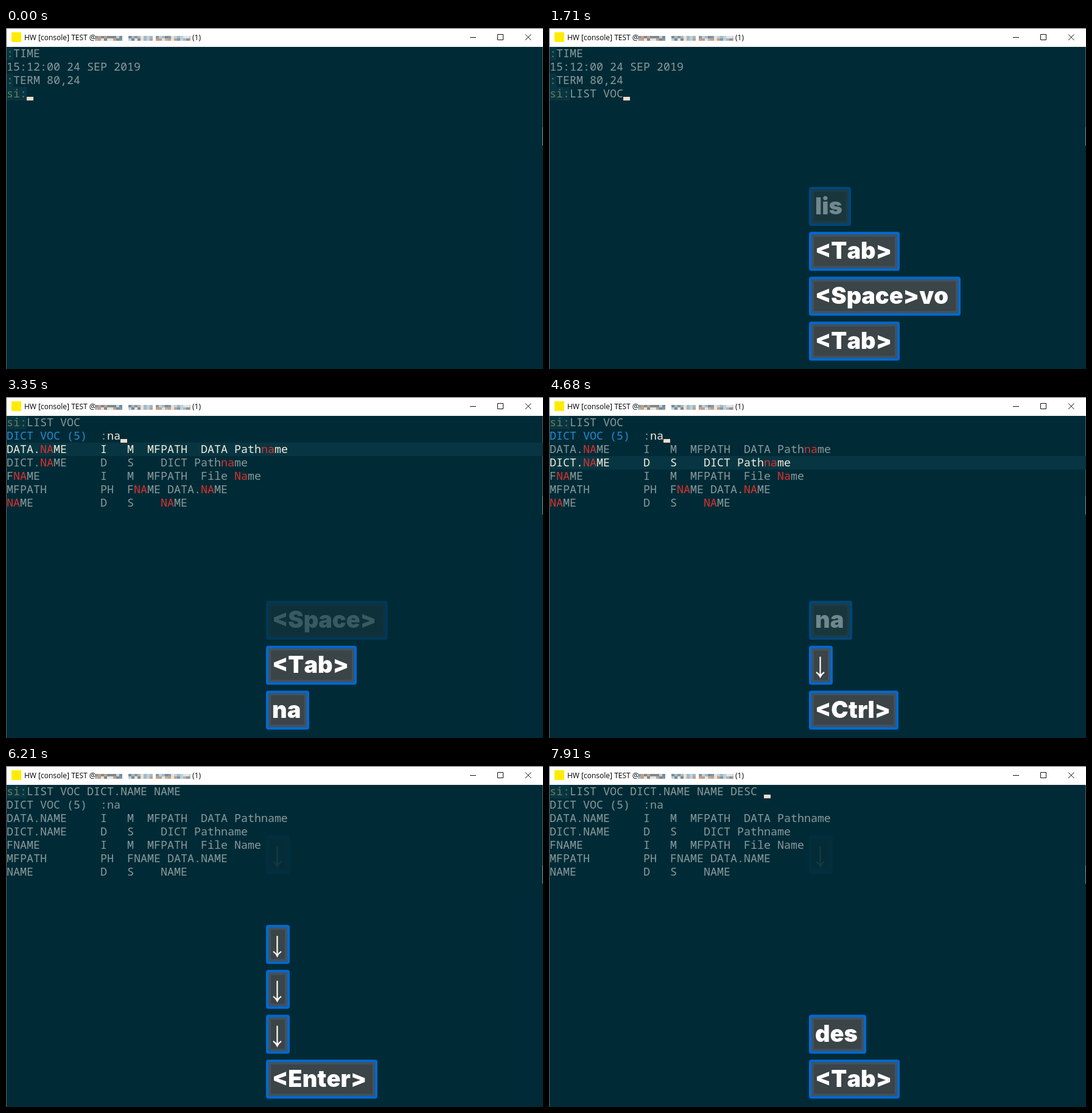
Recreate the animation shown at these times as an HTML page. Size 882 px wide and 560 px high, loop 8000 ms.

```html
<!DOCTYPE html>
<html lang="en">
<head>
<meta charset="utf-8">
<title>Console completion</title>
<style>
html, body { margin: 0; width: 100%; height: 100%; overflow: hidden; background: #002b36; }
svg { display: block; }
text { white-space: pre; }
.title { font: 12px "Open Sans", sans-serif; fill: #000; }
.term { font: 18.333px "Noto Sans Mono", monospace; fill: #8a9a9c; }
.bright { fill: #f3eedc; }
.blue { fill: #268bd2; }
.red { fill: #dc322f; }
.prompt { fill: #6f7a58; }
.key text { font: 900 38px Inter, sans-serif; font-kerning: none; fill: #fff; }
.key path { fill: none; stroke: #fff; stroke-width: 2.2; }
</style>
</head>
<body>
<svg width="882" height="560" viewBox="0 0 882 560">
  <rect width="882" height="560" fill="#002b36"/>
  <rect width="882" height="31" fill="#fff"/>
  <rect width="882" height="1" fill="#5c6468"/>
  <rect width="1" height="560" fill="#5c6468"/>
  <rect x="881" y="31" width="1" height="132" fill="#4d6067"/>
  <rect x="881" y="163" width="1" height="30" fill="#84949a"/>
  <rect x="9" y="7" width="16" height="16" fill="#ffec00"/>
  <text class="title" x="30" y="20">HW [console] TEST @</text>
  <text class="title" x="306" y="20">(1)</text>
  <g id="mosaic"></g>
  <path d="M762 15.5h10M807.5 10.5h9v9h-9zM853 10.5l9.5 9.5M862.5 10.5l-9.5 9.5" fill="none" stroke="#111"/>
  <g id="screen" class="term"></g>
  <g id="keys"></g>
</svg>
<script>
const LOOP = 8000, CELL = 11, LINE = 22, TOP = 31;
const MENU_OPEN = 2650, MENU_CLOSE = 5970;
const $ = id => document.getElementById(id);

const base = 'LIST VOC ', picked = base + 'DICT.NAME ', both = picked + 'NAME ';
const typed = [
  [0, ''], [80, 'l'], [320, 'li'], [400, 'lis'], [720, 'LIST'], [1020, 'LIST '],
  [1190, 'LIST v'], [1260, 'LIST vo'], [1570, 'LIST VOC'], [1950, base],
  [4830, picked], [5970, both], [7220, both + 'd'], [7310, both + 'de'],
  [7460, both + 'des'], [7910, both + 'DESC ']
];
const queries = [[0, ''], [3200, 'n'], [3270, 'na']];
const selections = [[0, 0], [4360, 1], [5200, 2], [5430, 3], [5590, 4]];
const hiddenCursor = [[2340, MENU_OPEN], [MENU_CLOSE, 6440], [6970, 7220]];

// Each key: fade start, then its labels as [time, text, box width].
const TAB = '<Tab>', SPACE = '<Space>', DOWN = '↓';
const keys = [
  [1555, [80, 'l', 33], [320, 'li', 46], [400, 'lis', 69]],
  [1720, [550, TAB, 149]],
  [2490, [1020, SPACE, 200], [1190, SPACE + 'v', 224], [1260, SPACE + 'vo', 249]],
  [2580, [1420, TAB, 149]],
  [3120, [1950, SPACE, 200]],
  [3810, [2490, TAB, 149]],
  [4520, [3200, 'n', 46], [3270, 'na', 71]],
  [5510, [4360, DOWN, 39]],
  [5900, [4510, '<Ctrl>', 147], [4750, '<Ctrl>+' + TAB, 298]],
  [6440, [5200, DOWN, 39]],
  [6600, [5430, DOWN, 39]],
  [6830, [5590, DOWN, 39]],
  [7020, [5740, '<Enter>', 183]],
  [9000, [7220, 'd', 46], [7310, 'de', 71], [7460, 'des', 94]],
  [9000, [7760, TAB, 149]]
].map(([fade, ...labels]) => ({ fade, labels }));

const field = (name, type, kind, rest) =>
  name.padEnd(14) + type.padEnd(4) + kind.padEnd(3) + rest;
const matches = [
  field('DATA.NAME', 'I', 'M', 'MFPATH  DATA Pathname'),
  field('DICT.NAME', 'D', 'S', '  DICT Pathname'),
  field('FNAME', 'I', 'M', 'MFPATH  File Name'),
  field('MFPATH', 'PH', '', '').slice(0, 18) + 'FNAME DATA.NAME',
  field('NAME', 'D', 'S', '  NAME')
];
const numbered = Array.from({ length: 14 }, (_, i) =>
  field('F' + (i + 1), 'D', 'S', '  F' + (i + 1)));
const allItems = [
  matches[0], field('DESC', 'I', 'S', '  Description'), matches[1],
  ...numbered, ...matches.slice(2),
  field('SIZE', 'D', 'S', '  Size'), field('TYPE', 'I', 'S', '  Type')
];

const last = (list, t) => list.filter(e => e[0] <= t).pop();
const esc = s => s.replace(/</g, '&lt;').replace(/>/g, '&gt;');
const rect = (x, y, w, h, fill, extra = '') =>
  `<rect x="${x}" y="${y}" width="${w}" height="${h}" fill="${fill}" ${extra}/>`;
const span = (cls, s) => `<tspan class="${cls}">${s}</tspan>`;
const row = (r, html, cls = '') =>
  `<text class="${cls}" x="1" y="${TOP + LINE * r + 17}">${html}</text>`;
const shade = (r, w) => rect(1, TOP + LINE * r, w, LINE, '#073642');
const cursor = (r, col) =>
  rect(1 + CELL * col, TOP + LINE * r + 16, CELL, 6, '#f6dacb');
const promptRow = (r, prompt, text) =>
  shade(r, CELL * prompt.length) + row(r, span('prompt', prompt) + text);

function menu(t) {
  const active = t < MENU_CLOSE;
  const query = last(queries, t)[1], chosen = last(selections, t)[1];
  const items = query === 'na' ? matches : allItems;
  const head = `DICT VOC (${items.length})`.padEnd(14);
  let out = row(1, active ? span('blue', head) + ':' + span('bright', query) : head + ':' + query);
  items.forEach((item, i) => {
    const lit = active && i === chosen;
    const html = active && query === 'na' ? item.replace(/na/gi, m => span('red', m)) : item;
    out += (lit ? shade(i + 2, 881) : '') + row(i + 2, html, lit ? 'bright' : '');
  });
  return out + (active ? cursor(1, 15 + query.length) : '');
}

function screen(t) {
  const text = last(typed, t)[1], opened = t >= MENU_OPEN;
  const r = opened ? 0 : 3;
  let out = promptRow(r, 'si:', text);
  out += opened ? menu(t)
    : promptRow(0, ':', 'TIME') + row(1, '15:12:00 24 SEP 2019') + promptRow(2, ':', 'TERM 80,24');
  const inMenu = opened && t < MENU_CLOSE;
  const hidden = hiddenCursor.some(([a, b]) => t >= a && t < b);
  return out + (inMenu || hidden ? '' : cursor(r, 3 + text.length));
}

function keyBox(label, width, slot, opacity) {
  const glyph = label === DOWN
    ? '<path d="M18.5 18V51M12 43.5Q16.5 46.5 18.5 51Q20.5 46.5 25 43.5"/>'
    : `<text x="10" y="44.5">${esc(label)}</text>`;
  return `<g class="key" opacity="${opacity}" transform="translate(427 ${(482.2 - 73.7 * slot).toFixed(1)})">` +
    rect(0, 0, width, 64, '#0069d2', 'rx="4"') +
    rect(4, 4, width - 8, 56, '#41525f') +
    rect(8, 8, width - 16, 48, '#3b4447') + glyph + '</g>';
}

function keyStack(t) {
  const pressed = keys.filter(k => k.labels[0][0] <= t);
  const boxes = pressed.map(({ fade, labels }, i) => {
    const [, label, width] = last(labels, t);
    const opacity = t < fade ? 1 : 0.86 - 0.212 * Math.floor((t - fade) / 76);
    return opacity > 0.02 ? keyBox(label, width, pressed.length - 1 - i, opacity.toFixed(2)) : '';
  });
  // A faint trace of one arrow stays on screen.
  return boxes.join('') + (t >= 5814 ? keyBox(DOWN, 39, 5, 0.07) : '');
}

function drawMosaic() {
  const tones = ['#8497a3', '#c49f86', '#b4d3e4', '#e9e2d8', '#7c8a92', '#a9b7bf'];
  let seed = 7, out = '';
  const random = () => (seed = seed * 16807 % 2147483647) / 2147483647;
  for (const [from, to] of [[146, 191], [201, 241], [246, 303]])
    for (let x = from; x < to; x += 5)
      for (let y = 13; y < 21; y += 4)
        out += rect(x, y, Math.min(5, to - x), 4, tones[Math.floor(random() * tones.length)]);
  $('mosaic').innerHTML = out;
}

const shown = {};
function update(id, html) {
  if (shown[id] !== html) $(id).innerHTML = shown[id] = html;
}

function frame() {
  const t = performance.now() % LOOP;
  update('screen', screen(t));
  update('keys', keyStack(t));
  requestAnimationFrame(frame);
}

drawMosaic();
frame();
</script>
</body>
</html>
```
